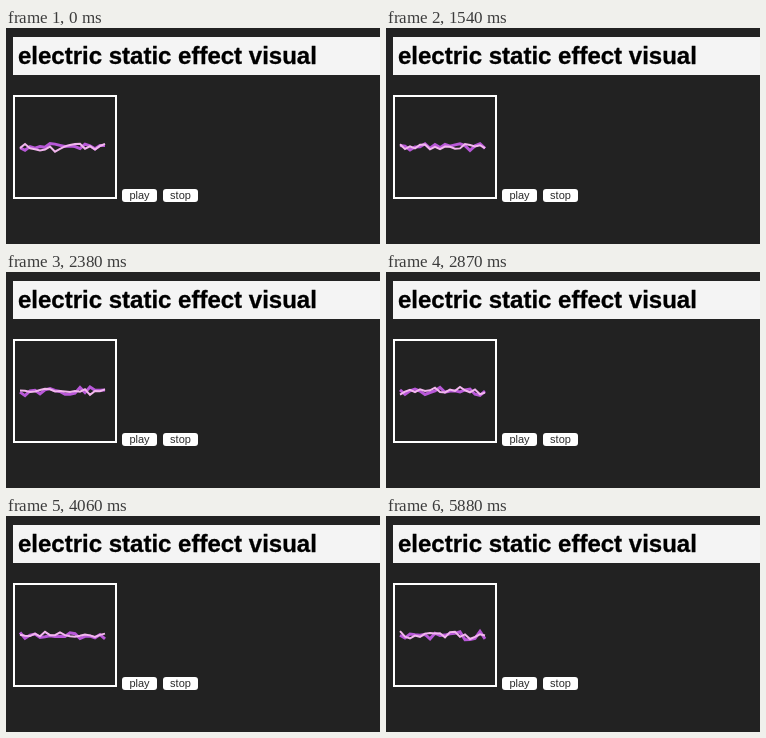
Recreate the animation shown at these times as an HTML page. Size 374 by 216 pixels, loop 5950 ms.

```html
<!DOCTYPE html>
<html lang="en">
<head>
<meta charset="utf-8">
<title>electric static effect visual</title>
<style>
html, body { margin: 0; width: 100%; height: 100%; overflow: hidden; background: #222; }
svg { display: block; }
text { font-family: "Liberation Sans", Arial, sans-serif; }
.title { font-size: 24px; font-weight: bold; stroke: #000; stroke-width: 0.3; }
.label { font-size: 11px; fill: #2b2b2b; text-anchor: middle; }
.bolt { fill: none; stroke-linejoin: miter; }
</style>
</head>
<body>
<svg width="374" height="216" viewBox="0 0 374 216">
  <defs>
    <linearGradient id="blue" x1="0" y1="0" x2="0" y2="1">
      <stop offset="0" stop-color="#6ba4fb"/>
      <stop offset="1" stop-color="#3468df"/>
    </linearGradient>
  </defs>
  <rect width="374" height="216" fill="#222"/>
  <rect x="7" y="9" width="367" height="38" fill="#f4f4f4"/>
  <text class="title" x="12" y="36">electric static effect visual</text>
  <rect x="8" y="68" width="102" height="102" fill="none" stroke="#fff" stroke-width="2"/>
  <path id="glow" class="bolt" stroke="#b858d8" stroke-width="3"/>
  <path id="core" class="bolt" stroke="#f2b6ee" stroke-width="2"/>
  <rect id="play"/>
  <text class="label" x="133.5" y="171">play</text>
  <rect id="stop"/>
  <text class="label" x="174.5" y="171">stop</text>
</svg>
<script>
const STEP = 70, STEPS = 85;
const POINTS = 18, GAP = 5, LEFT = 14, MIDDLE = 119, SWING = 5;
const el = id => document.getElementById(id);

function random(seed) {
  let s = seed * 7919 + 13;
  return () => {
    s = (s + 0x6D2B79F5) | 0;
    let r = Math.imul(s ^ (s >>> 15), 1 | s);
    r ^= r + Math.imul(r ^ (r >>> 7), 61 | r);
    return ((r ^ (r >>> 14)) >>> 0) / 4294967296;
  };
}

// Zigzag around the middle; two samples per point favour small offsets
function bolt(seed) {
  const next = random(seed);
  const points = Array.from({ length: POINTS }, (_, i) => {
    const y = MIDDLE + (next() + next() - 1) * SWING;
    return `${LEFT + i * GAP} ${y.toFixed(2)}`;
  });
  return "M" + points.join("L");
}

function button(id, x, pressed) {
  const grow = pressed ? 1 : 0;
  const attrs = {
    x: x - grow, y: 161 - grow, width: 35 + grow * 2, height: 13 + grow * 2,
    rx: 3 + grow * 0.5, fill: pressed ? "url(#blue)" : "#fff"
  };
  for (const name in attrs) el(id).setAttribute(name, attrs[name]);
}

// The bolt is frozen from a stop until play is released
const pauses = [{ from: 2, to: 11 }, { from: 58, to: 73 }];

function boltStep(k) {
  const pause = pauses.find(p => k >= p.from && k <= p.to);
  return pause ? pause.from : k;
}

let shown = -1;
function draw(time) {
  const k = Math.floor(time / STEP) % STEPS;
  if (k === shown) return;
  shown = k;
  const n = boltStep(k);
  el("glow").setAttribute("d", bolt(n * 2 + 1));
  el("core").setAttribute("d", bolt(n * 2 + 2));
  button("play", 116, pauses.some(p => k === p.to));
  button("stop", 157, k === pauses[1].from - 1);
}

const start = performance.now();
function tick() {
  draw(performance.now() - start);
  requestAnimationFrame(tick);
}
tick();
</script>
</body>
</html>
```
